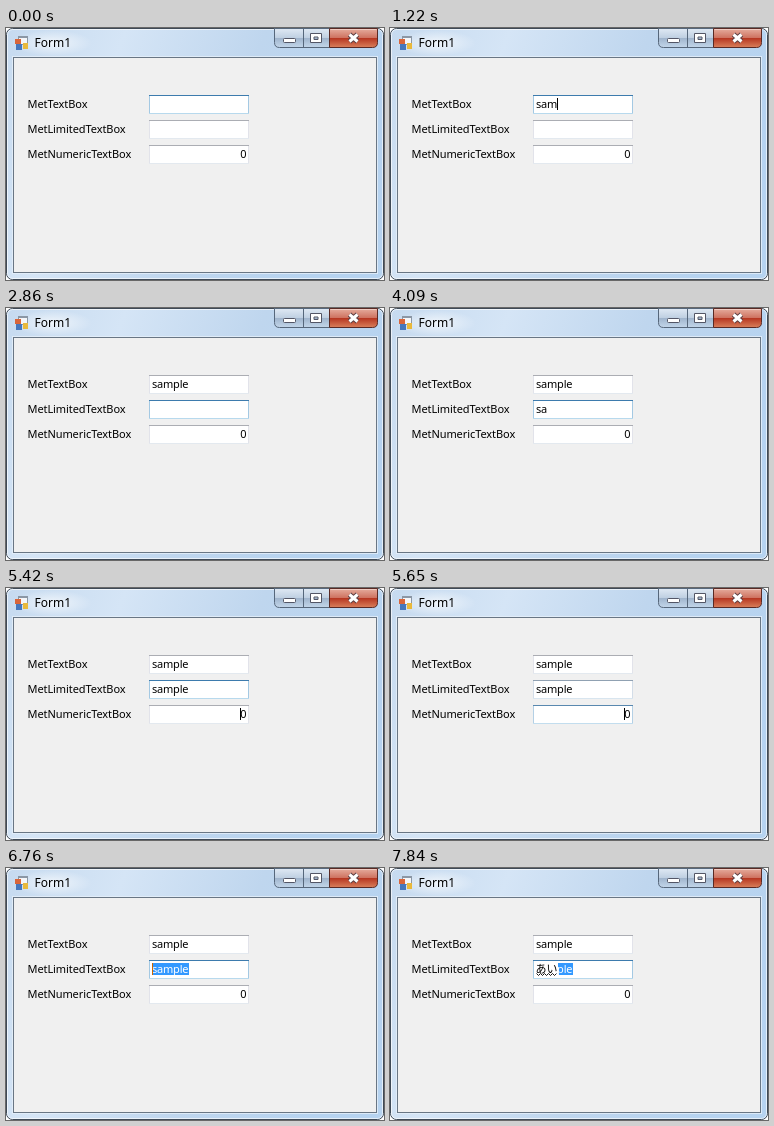
These frames come from a looping animation (378x252 px, 8 s). An HTML page:

```html
<!DOCTYPE html>
<html lang="en">
<head>
<meta charset="utf-8">
<title>Form1</title>
<style>
  html, body { margin: 0; width: 100%; height: 100%; overflow: hidden; background: #fff; }
  svg { display: block; width: 378px; height: 252px; }
  text { font: 11px "Noto Sans", "Open Sans", sans-serif; white-space: pre; }
  .label { letter-spacing: -0.08px; }
  .value { letter-spacing: -0.2px; }
  .kana { font-family: "Noto Sans CJK JP", "Noto Sans CJK", sans-serif; }
  .crisp, #fields rect { shape-rendering: crispEdges; }
</style>
</head>
<body>
<svg viewBox="0 0 378 252" xmlns="http://www.w3.org/2000/svg">
  <defs>
    <linearGradient id="glass" x2="1" y2="0.25">
      <stop offset="0" stop-color="#c6daef"/>
      <stop offset="0.3" stop-color="#d5e5f6"/>
      <stop offset="0.65" stop-color="#bfd6ee"/>
      <stop offset="1" stop-color="#b6d3f0"/>
    </linearGradient>
    <radialGradient id="glow">
      <stop offset="0" stop-color="#fff" stop-opacity="0.7"/>
      <stop offset="1" stop-color="#fff" stop-opacity="0"/>
    </radialGradient>
    <linearGradient id="button" x2="0" y2="1">
      <stop offset="0" stop-color="#dfe9f4"/>
      <stop offset="0.48" stop-color="#c0d0e2"/>
      <stop offset="0.5" stop-color="#9fb4cc"/>
      <stop offset="1" stop-color="#c3d6ea"/>
    </linearGradient>
    <linearGradient id="close" x2="0" y2="1">
      <stop offset="0" stop-color="#e6ae9f"/>
      <stop offset="0.48" stop-color="#cf7361"/>
      <stop offset="0.5" stop-color="#b5341f"/>
      <stop offset="1" stop-color="#d9805c"/>
    </linearGradient>
  </defs>

  <!-- window frame -->
  <rect x="0.5" y="0.5" width="377" height="251" rx="6" fill="url(#glass)" stroke="#3f4a57"/>
  <rect x="1.5" y="1.5" width="375" height="249" rx="5" fill="none" stroke="#fff" stroke-opacity="0.65"/>
  <ellipse cx="46" cy="15" rx="40" ry="13" fill="url(#glow)"/>
  <rect x="6.5" y="28.5" width="365" height="217" fill="none" stroke="#e6f0fa" stroke-opacity="0.8"/>
  <rect x="7.5" y="29.5" width="363" height="215" fill="#f0f0f0" stroke="#697684"/>

  <!-- title -->
  <g class="crisp">
    <rect x="12" y="8" width="10" height="9" fill="#8b97a5"/>
    <rect x="13" y="10" width="8" height="6" fill="#f4f6f9"/>
    <rect x="9" y="11" width="6" height="5" fill="#d9653a"/>
    <rect x="10" y="16" width="6" height="6" fill="#4677bd"/>
    <rect x="17" y="15" width="5" height="6" fill="#e9b93c"/>
  </g>
  <text x="28.5" y="19" style="font-size:12px">Form1</text>

  <!-- caption buttons -->
  <path d="M268.500 .5H323.500V19.500H273.500Q268.500 19.500 268.500 14.500Z" fill="url(#button)" stroke="#56677b"/>
  <path d="M297.500 1V19" stroke="#56677b"/>
  <path d="M323.500 .5H371.500V14.500Q371.500 19.500 366.500 19.500H323.500Z" fill="url(#close)" stroke="#5a2a25"/>
  <path d="M324.500 1.500H370.500" stroke="#fff" stroke-opacity="0.4"/>
  <rect x="277.5" y="10.500" width="12" height="4" rx="1" fill="#fff" stroke="#535666"/>
  <path d="M304.500 5.500H315.500V14.500H304.500ZM308 9V11.500H312V9Z" fill="#fff" fill-rule="evenodd" stroke="#535666"/>
  <g fill="none" stroke-width="5" stroke="#5d4044">
    <path d="M343.500 6.500L351.500 13.500M351.500 6.500L343.500 13.500"/>
    <path d="M343.500 6.500L351.500 13.500M351.500 6.500L343.500 13.500" stroke="#fff" stroke-width="3"/>
  </g>

  <g id="fields"></g>
</svg>

<script>
const LOOP = 8000;
const WORD = 'sample';
const KANA = 'あい';
const TOPS = [67, 92, 117];
const LABELS = ['MetTextBox', 'MetLimitedTextBox', 'MetNumericTextBox'];
const STOPS = [146, 152, 158, 167, 173, 176, 182]; // caret x after each letter
const KANA_STOPS = [146, 158, 168];

// time, focused field, letters typed there, caret shown
const KEYS = [
  [0, 0, 0, 0], [70, 0, 0, 1], [530, 0, 1, 1], [760, 0, 2, 1],
  [1220, 0, 3, 1], [1530, 0, 4, 1], [1860, 0, 5, 1],
  [2380, 1, 0, 1], [2860, 1, 0, 0], [3310, 1, 1, 1], [3630, 1, 2, 1],
  [4090, 1, 2, 0], [4190, 1, 3, 1], [4490, 1, 4, 1], [4960, 1, 5, 1],
  [5420, 2, 0, 1], [5950, 1, 6, 1], [6590, 1, 6, 0],
  [6760, 1, 6, 1], [7310, 1, 6, 0]
];
const SELECT_AT = 6760;
const KANA_AT = [7610, 7840];

// focus hand-overs: from, to, step times
const FADES = [
  [0, 1, [2380, 2460, 2560, 2630]],
  [1, 2, [5420, 5500, 5570, 5650, 5730]],
  [2, 1, [5950, 6040, 6130, 6200, 6270]]
];

// top, side and bottom edge, idle and focused
const EDGES = [
  [[171, 173, 179], [61, 123, 173]],
  [[226, 227, 234], [164, 201, 227]],
  [[227, 233, 239], [183, 217, 237]]
];

const root = document.getElementById('fields');

function add(tag, attrs, text = '') {
  const el = document.createElementNS('http://www.w3.org/2000/svg', tag);
  for (const k in attrs) el.setAttribute(k, attrs[k]);
  el.textContent = text;
  root.appendChild(el);
  return el;
}
const rect = (x, y, width, height, fill) => add('rect', { x, y, width, height, fill });
const show = (el, on) => el.setAttribute('visibility', on ? 'visible' : 'hidden');

const fields = TOPS.map((y, i) => {
  add('text', { class: 'label', x: 21.5, y: y + 13 }, LABELS[i]);
  rect(143, y, 100, 19, '#fff');
  const sides = [rect(143, y, 1, 19), rect(242, y, 1, 19)];
  const bottom = rect(143, y + 18, 100, 1);
  const top = rect(143, y, 100, 1);
  const value = i < 2
    ? add('text', { class: 'value', x: 146, y: y + 13 })
    : add('text', { x: 240.5, y: y + 13, 'text-anchor': 'end' }, '0');
  return { edges: [[top], sides, [bottom]], value };
});

const highlight = rect(146, 95, 37, 12, '#3399ff');
const selected = add('text', { class: 'value', x: 146, y: 105, fill: '#fff' }, WORD);
const cover = rect(146, 95, 0, 13, '#fff');
const kana = add('text', { class: 'kana', x: 145.5, y: 105 });
const wave = add('path', { fill: 'none', stroke: '#000', 'stroke-width': 0.9 });
const caret = rect(0, 0, 1, 12, '#000');

function wavePath(end) {
  let d = 'M146.5 105.5';
  for (let x = 148.5, low = true; x < end; x += 2, low = !low) d += `L${x} ${low ? 107.5 : 105.5}`;
  return d;
}

function focusLevels(t) {
  const levels = [1, 0, 0];
  for (const [from, to, steps] of FADES) {
    if (t < steps[0]) break;
    const p = (steps.filter(s => s <= t).length - 1) / (steps.length - 1);
    levels[from] = 1 - p;
    levels[to] = p;
  }
  return levels;
}

function typed(t, field) {
  const past = KEYS.filter(k => k[0] <= t);
  const moved = past.some(k => k[1] > field);
  return moved ? WORD.length : past.reduce((n, k) => k[1] === field ? k[2] : n, 0);
}

function render(t) {
  focusLevels(t).forEach((p, i) => {
    fields[i].edges.forEach((parts, e) => {
      const [idle, lit] = EDGES[e];
      const color = `rgb(${idle.map((c, k) => Math.round(c + (lit[k] - c) * p))})`;
      parts.forEach(el => el.setAttribute('fill', color));
    });
    if (i < 2) fields[i].value.textContent = WORD.slice(0, typed(t, i));
  });

  const selecting = t >= SELECT_AT;
  const count = KANA_AT.filter(k => k <= t).length;
  show(highlight, selecting);
  show(selected, selecting);
  show(fields[1].value, !selecting);
  cover.setAttribute('width', KANA_STOPS[count] - 146);
  kana.textContent = KANA.slice(0, count);
  wave.setAttribute('d', count ? wavePath(KANA_STOPS[count]) : '');

  const [, field, letters, on] = KEYS.filter(k => k[0] <= t).pop();
  caret.setAttribute('x', field === 2 ? 234 : STOPS[selecting ? 0 : letters]);
  caret.setAttribute('y', TOPS[field] + 3);
  caret.setAttribute('fill', selecting ? '#cc6600' : '#000');
  show(caret, on);
}

const start = performance.now();
function tick() {
  render((performance.now() - start) % LOOP);
  requestAnimationFrame(tick);
}
tick();
</script>
</body>
</html>
```
